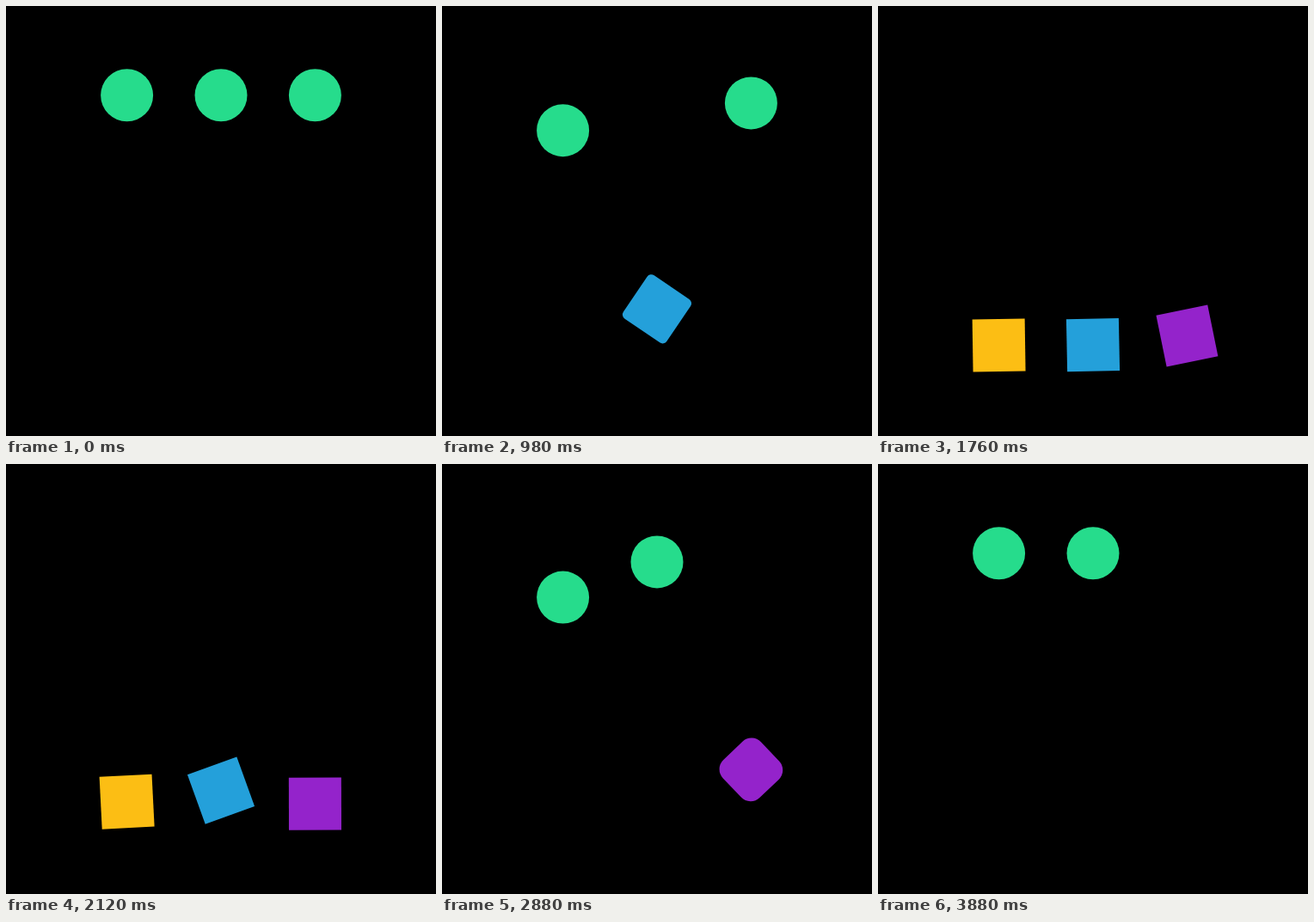
An HTML page that plays this animation: 500x500 px, repeating every 3.9 s.

```html
<!DOCTYPE html>
<html lang="en">
<head>
<meta charset="utf-8">
<title>Falling shapes</title>
<style>
  html, body { margin: 0; width: 100%; height: 100%; overflow: hidden; background: #000; }
  svg { display: block; width: 100%; height: 100%; }
</style>
</head>
<body>
<svg id="stage" viewBox="0 0 500 500"></svg>
<script>
const LOOP = 3900, STEP = 20;
const TOP = 103.8, BOTTOM = 395.2, HALF = 30.5;
const FALL = 1575, RISE = 1690;
const GREEN = '#26dc8c';

const shapes = [
  { x: 140.6, start: 300, color: '#fcbe14' },
  { x: 250, start: 16, color: '#24a0da' },
  { x: 359.4, start: 581, color: '#9423cb', end: 3880 }
];

const clamp = v => Math.min(1, Math.max(0, v));

// Cubic Bezier easing with control points (x1, 0) and (x2, 1).
function ease(u, x1, x2) {
  let lo = 0, hi = 1;
  for (let i = 0; i < 30; i++) {
    const s = (lo + hi) / 2, r = 1 - s;
    if (3 * x1 * s * r * r + 3 * x2 * s * s * r + s ** 3 < u) lo = s;
    else hi = s;
  }
  return lo * lo * (3 - 2 * lo);
}

const travel = u => ease(clamp(u), 0.98, 0.11);

// The circle turns into a spinning square on the way down.
function falling(t) {
  const since = t - 800;
  return {
    y: travel(t / FALL),
    square: since >= 0,
    radius: HALF * (1 - clamp(since / 293)) ** 2,
    angle: -Math.max(0, 181.5 * Math.exp(-0.0071 * since) - 0.8)
  };
}

// The square spins back and rounds off on the way up.
function rising(t) {
  return {
    y: 1 - travel(t / RISE),
    square: t < 895,
    radius: HALF * clamp((t - 555) / 340),
    angle: -45 * (t / 733) ** 2.5
  };
}

const stage = document.getElementById('stage');
for (const shape of shapes) {
  shape.node = document.createElementNS(stage.namespaceURI, 'rect');
  for (const side of ['x', 'y']) shape.node.setAttribute(side, -HALF);
  for (const side of ['width', 'height']) shape.node.setAttribute(side, 2 * HALF);
  stage.append(shape.node);
}

function draw(time) {
  for (const { x, start, color, end = LOOP, node } of shapes) {
    const t = time - start;
    const pose = t < FALL ? falling(t) : rising(t - FALL);
    const y = TOP + (BOTTOM - TOP) * pose.y;
    const angle = pose.square ? pose.angle : 0;
    node.setAttribute('transform', `translate(${x} ${y}) rotate(${angle})`);
    node.setAttribute('rx', pose.square ? pose.radius : HALF);
    node.setAttribute('fill', pose.square ? color : GREEN);
    node.setAttribute('visibility', time < end ? 'visible' : 'hidden');
  }
}

const begin = performance.now();
function tick() {
  const time = (performance.now() - begin) % LOOP;
  draw(Math.floor(time / STEP) * STEP);
  requestAnimationFrame(tick);
}
tick();
</script>
</body>
</html>
```
